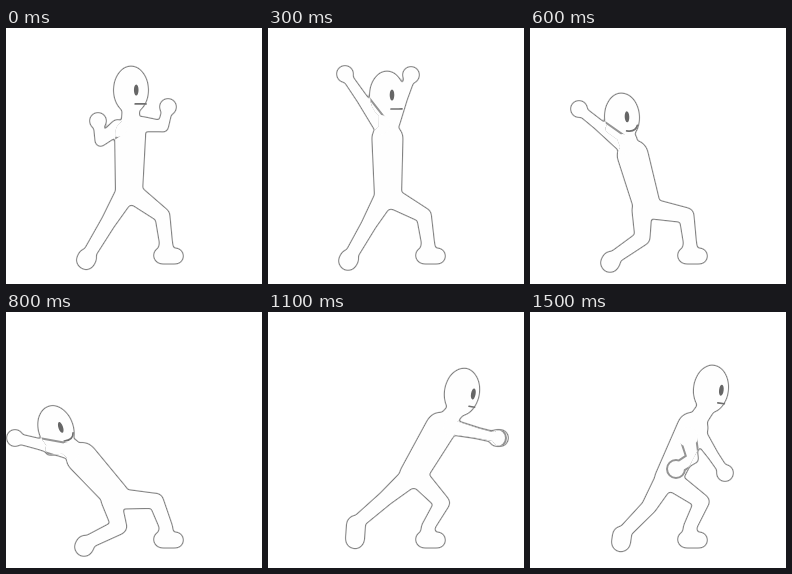
Animation, 256 px wide and 256 px high, one loop 1.6 s. Source, as an HTML page:

```html
<!DOCTYPE html>
<html lang="en">
<head>
<meta charset="utf-8">
<title>Windup and throw</title>
<style>
html, body { margin: 0; width: 100%; height: 100%; overflow: hidden; background: #fff; }
svg { display: block; width: 100vw; height: 100vh; }
#nearLine { fill: #949494; stroke: #949494; stroke-width: 4; }
#nearFill { fill: #fefefe; }
#eye { fill: #666; }
#mouth { fill: none; stroke: #707070; stroke-width: 1.7; stroke-linecap: round; }
</style>
</head>
<body>
<svg viewBox="0 0 256 256">
  <defs>
    <!-- Blur, then cut at two levels: a soft-cornered white shape with a thin outline. -->
    <filter id="skin" filterUnits="userSpaceOnUse" x="0" y="0" width="256" height="256" color-interpolation-filters="sRGB">
      <feGaussianBlur stdDeviation="1.6" result="soft"/>
      <feComponentTransfer in="soft" result="wide"><feFuncA type="linear" slope="4" intercept="-.5"/></feComponentTransfer>
      <feComponentTransfer in="soft" result="inner"><feFuncA type="linear" slope="4" intercept="-1.5"/></feComponentTransfer>
      <feFlood flood-color="#808080"/>
      <feComposite in2="wide" operator="in" result="outline"/>
      <feFlood flood-color="#fefefe"/>
      <feComposite in2="inner" operator="in" result="white"/>
      <feMerge><feMergeNode in="outline"/><feMergeNode in="white"/></feMerge>
    </filter>
    <path id="body"/>
    <ellipse id="skull" rx="17" ry="23.5"/>
    <clipPath id="behind"><use href="#body"/><use href="#skull"/></clipPath>
  </defs>
  <rect width="256" height="256" fill="#fff"/>
  <g filter="url(#skin)">
    <use href="#body"/><use href="#skull"/><path id="nearArm"/>
  </g>
  <g clip-path="url(#behind)">
    <path id="nearLine"/>
    <path id="nearFill"/>
  </g>
  <g id="face">
    <ellipse id="eye" rx="2.3" ry="5.6"/>
    <path id="mouth"/>
  </g>
</svg>
<script>
const LOOP = 1600, STEP = 100, DEG = Math.PI / 180;

// Only the ends of the body are posed; every other joint is solved.
const poses = [
  { at: 0, head: [125, 62], pelvis: [123, 164], near: [92, 93], far: [162, 79], foot: [80, 231] },
  { at: 300, head: [119, 67], pelvis: [120, 168], near: [77, 46], far: [143, 47], foot: [80, 232] },
  { at: 600, head: [92, 89], pelvis: [117, 178], near: [49, 81], far: [93, 85], foot: [80, 234] },
  { at: 800, head: [50, 117], pelvis: [110, 184], near: [9, 126], far: [48, 118], foot: [78, 234] },
  { at: 1100, head: [194, 80], pelvis: [145, 163], near: [229, 126], far: [232, 126], foot: [87, 220] },
  { at: 1300, head: [231, 95], pelvis: [152, 161], near: [216, 179], far: [223, 184], foot: [104, 220] },
  { at: 1500, head: [181, 77], pelvis: [138, 167], near: [146, 157], far: [195, 161], foot: [91, 227] }
];

const el = id => document.getElementById(id);
const f = v => v.toFixed(2);
const clamp = v => Math.min(1, Math.max(0, v));
const add = ([x, y], dx, dy) => [x + dx, y + dy];
const mix = (a, b, u) => a.map((v, i) => v + (b[i] - v) * u);
const toward = (a, b, r) => mix(a, b, r / Math.hypot(b[0] - a[0], b[1] - a[1]));
const arc = (t, from, to) => Math.sin(Math.PI * clamp((t - from) / (to - from)));

// Monotone cubic through the looping poses, so nothing overshoots.
const n = poses.length;
const pose = i => poses[(i + n) % n];
const timeAt = i => pose(i).at + Math.floor(i / n) * LOOP;
function sample(part, t) {
  let i = n - 1;
  while (poses[i].at > t) i--;
  const span = timeAt(i + 1) - timeAt(i), u = (t - timeAt(i)) / span;
  return pose(i)[part].map((a, c) => {
    const slope = k => (pose(k + 1)[part][c] - pose(k)[part][c]) / (timeAt(k + 1) - timeAt(k));
    const tangent = k => {
      const p = slope(k - 1), q = slope(k);
      return p * q > 0 ? 2 * p * q / (p + q) : 0;
    };
    const d = pose(i + 1)[part][c] - a, m0 = tangent(i) * span, m1 = tangent(i + 1) * span;
    return a + u * (m0 + u * (3 * d - 2 * m0 - m1 + u * (m0 + m1 - 2 * d)));
  });
}

// Elbow or knee between a and b, bending to the side that faces (px, py).
function joint(a, b, l1, l2, [px, py]) {
  const dx = b[0] - a[0], dy = b[1] - a[1], d = Math.hypot(dx, dy);
  if (d >= l1 + l2) return mix(a, b, l1 / (l1 + l2));
  const along = (l1 * l1 - l2 * l2 + d * d) / (2 * d);
  const out = Math.sqrt(Math.max(0, l1 * l1 - along * along));
  const side = Math.sign(px * dy - py * dx) || 1;
  return [a[0] + (dx * along + side * dy * out) / d, a[1] + (dy * along - side * dx * out) / d];
}

function dot([x, y], r) {
  return `M${f(x - r)} ${f(y)}a${r} ${r} 0 1 1 ${2 * r} 0a${r} ${r} 0 1 1 ${-2 * r} 0Z`;
}

// Tapered capsule joining two circles.
function limb(a, ra, b, rb) {
  const dx = b[0] - a[0], dy = b[1] - a[1], d = Math.hypot(dx, dy);
  if (d <= Math.abs(ra - rb) + .01) return ra > rb ? dot(a, ra) : dot(b, rb);
  const dir = Math.atan2(dy, dx), spread = Math.acos((ra - rb) / d);
  const at = ([x, y], r, s) => f(x + r * Math.cos(dir + s)) + ' ' + f(y + r * Math.sin(dir + s));
  const big = ra >= rb ? 1 : 0;
  return `M${at(a, ra, spread)}A${ra} ${ra} 0 ${big} 1 ${at(a, ra, -spread)}` +
    `L${at(b, rb, -spread)}A${rb} ${rb} 0 ${1 - big} 1 ${at(b, rb, spread)}Z`;
}

// Shoulders slide round the chest toward the hand; elbows drop down and back.
function arm(chest, hand) {
  const shoulder = toward(add(chest, 0, -3), hand, 13);
  const elbow = joint(shoulder, hand, 22, 20, [-.3, 1]);
  return { shoulder, path: limb(shoulder, 7, elbow, 5) + limb(elbow, 5, hand, 4.5) + dot(hand, 8) };
}

function leg(hip, ankle, thigh, shin) {
  const knee = joint(hip, ankle, thigh, shin, [1, 0]);
  return limb(hip, 9.5, knee, 7) + limb(knee, 7, ankle, 6);
}

function draw(t) {
  const [head, pelvis, near, far, foot] = ['head', 'pelvis', 'near', 'far', 'foot'].map(k => sample(k, t));

  // Hands go over the top in the throw, then reach out on release.
  const lift = -45 * arc(t, 800, 1100), reach = 16 * arc(t, 1100, 1300);
  const chest = mix(pelvis, head, .57);
  const nearArm = arm(chest, add(near, reach, lift));
  const farArm = arm(chest, add(far, reach, lift));

  const lean = Math.atan2(head[0] - pelvis[0], pelvis[1] - head[1]) / DEG;
  const tilt = lean * Math.abs(lean) / 95;
  const chin = add(head, -14 * Math.sin(tilt * DEG), 14 * Math.cos(tilt * DEG));

  // The sole stands up as the heel lifts.
  const half = Math.max(1, (233 - foot[1]) / 1.8);
  const ankle = [160, 215];

  el('body').setAttribute('d', [
    limb(chin, 8, chest, 9),
    limb(chest, 15, pelvis, 13),
    leg(add(pelvis, -5, 4), add(foot, 2, -half - 2), 28, 37),
    limb(add(foot, 1, -half), 9, add(foot, 0, half), 9),
    leg(add(pelvis, 6, 3), ankle, 34, 28),
    limb(ankle, 6, [160, 226], 8),
    limb([156, 227.5], 8, [169.5, 228], 7.5),
    farArm.path
  ].join(''));
  el('nearArm').setAttribute('d', nearArm.path);
  el('nearLine').setAttribute('d', nearArm.path);
  el('nearFill').setAttribute('d', nearArm.path + dot(nearArm.shoulder, 10));

  const place = `translate(${f(head[0])} ${f(head[1])}) rotate(${f(tilt)})`;
  el('skull').setAttribute('transform', place);
  el('face').setAttribute('transform', place);

  // Leaning forward turns the face away; leaning back brings a smile.
  const turn = clamp(lean / 40), smile = clamp(-lean / 15);
  const x = 4 + 7 * turn, y = 14 - 1.5 * turn;
  el('eye').setAttribute('cx', f(5 + 8.5 * turn));
  el('mouth').setAttribute('d', `M${f(x)} ${f(y)}Q${f(x / 2 + 9 + 2 * smile)} ${f(y + 2 * smile)} 15 ${f(y - 5 * smile)}`);
}

const start = performance.now();
function tick() {
  const t = (performance.now() - start) % LOOP;
  draw(Math.floor(t / STEP) * STEP);
  requestAnimationFrame(tick);
}
tick();
</script>
</body>
</html>
```
